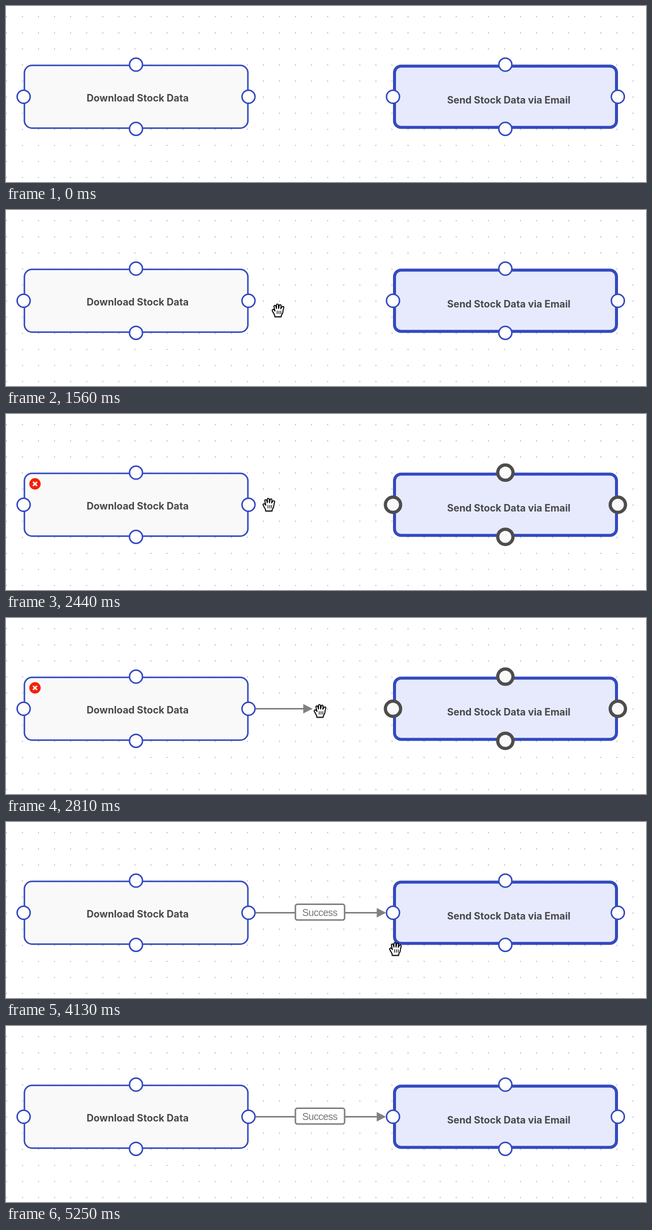
Animation, 1280 px wide and 352 px high, one loop 5.31 s. Source, as an HTML page with a canvas:

```html
<!DOCTYPE html>
<html lang="en">
<head>
<meta charset="utf-8">
<title>Connecting two steps</title>
<style>
html, body { margin: 0; width: 100%; height: 100%; overflow: hidden; background: #fff; }
canvas { display: block; }
</style>
</head>
<body>
<canvas id="stage" width="1280" height="352"></canvas>
<script>
const ctx = document.getElementById('stage').getContext('2d');
const LOOP = 5310, STEP = 62.5;
const BLUE = '#344abf', GREY = '#808080', DARK = '#4d4d4d';
const MID_Y = 181.5;

// Moments at which the state switches, in ms
const T = { enter: 1190, hover: 1870, drag: 2240, leave: 2370, snap: 3300, drop: 3740, off: 3860, exit: 5060 };

// Cursor path: time, x, y
const PATH = [
  [1190, 600, 375], [1560, 544, 201], [2000, 489.5, 180], [2250, 489.5, 180],
  [2810, 628, 186], [3400, 757, 199], [3740, 757, 199],
  [4440, 795, 295], [4690, 798, 305], [5060, 806, 375]
];

const HAND = new Path2D('M-6.5 12.5V9.5C-8 7-10 3-11.2 1C-12.4-1.2-9.8-3.4-7.8-1.2L-6 1L-8-7.5' +
  'C-8.6-10.3-5.3-11.3-4.4-8.5L-3-4V-10.5C-3-13.7 .6-13.7 .8-10.5L1.2-4L2.6-10' +
  'C3.2-12.8 6.6-12 6.2-9L5.5-3.5L8-7C9.6-9.4 12.4-7.6 11.4-5C10-1.5 10 1 9.5 4' +
  'C9 7 7 8.5 6.5 10V12.5Z');
const POINTER = new Path2D('M-5.5 12.5V10C-7 7-9.5 5-11 2C-12-.5-9.5-2-7.5 0L-5.8 2L-8.8-9' +
  'C-9.5-12.5-6-13.2-5-10.5L-2.8-4C-1.8-5.8 .9-5.4 1.3-3.4C2.6-4.8 5-4.2 5.4-2.2' +
  'C7.2-3.2 9.3-2 9.6 .2C10.4 4 9.6 6 8.5 8.5L7.5 12.5Z');

function cursorAt(t) {
  let i = 0;
  while (i < PATH.length - 2 && t > PATH[i + 1][0]) i++;
  const [t0, x0, y0] = PATH[i], [t1, x1, y1] = PATH[i + 1];
  const p = Math.min(1, Math.max(0, (t - t0) / (t1 - t0)));
  const e = p * p * (3 - 2 * p);
  return { x: x0 + (x1 - x0) * e, y: y0 + (y1 - y0) * e };
}

function line(x0, y0, x1, y1, color, width) {
  ctx.strokeStyle = color;
  ctx.lineWidth = width;
  ctx.beginPath();
  ctx.moveTo(x0, y0);
  ctx.lineTo(x1, y1);
  ctx.stroke();
}

function box(x, y, w, h, r, border, stroke, fill) {
  ctx.beginPath();
  ctx.roundRect(x + border / 2, y + border / 2, w - border, h - border, r);
  ctx.fillStyle = fill;
  ctx.fill();
  ctx.strokeStyle = stroke;
  ctx.lineWidth = border;
  ctx.stroke();
}

function text(str, x, y, font, color, spacing) {
  ctx.font = font;
  ctx.letterSpacing = spacing;
  ctx.fillStyle = color;
  ctx.textAlign = 'center';
  ctx.fillText(str, x, y);
}

function port(x, y, outer, width, stroke, fill, alpha = 1) {
  ctx.globalAlpha = alpha;
  ctx.beginPath();
  ctx.arc(x, y, outer - width / 2, 0, 7);
  ctx.fillStyle = fill;
  ctx.fill();
  ctx.strokeStyle = stroke;
  ctx.lineWidth = width;
  ctx.stroke();
  ctx.globalAlpha = 1;
}

const bluePort = (x, y, alpha) => port(x, y, 14.5, 3, BLUE, '#fff', alpha);
const darkPort = (x, y) => port(x, y, 18.5, 6.5, DARK, '#f9f9f9');
const bigPort = (x, y) => port(x, y, 21.5, 12, DARK, '#fff');

function dots() {
  ctx.fillStyle = '#6464b4';
  for (let y = 21.5; y < 352; y += 32.15)
    for (let x = 0.8; x < 1280; x += 32.13) ctx.fillRect(x - 0.7, y - 0.7, 1.4, 1.4);
}

function node(x, label, baseline, border, fill) {
  box(x, 117.3, 450, 128.4, border > 4 ? 13 : 15, border, BLUE, fill);
  text(label, x + 228 + (border > 4 ? 3.5 : 0), baseline, '700 19.6px Inter, sans-serif', '#48484b', '0px');
}

function removeBadge() {
  ctx.fillStyle = '#f4200c';
  ctx.beginPath();
  ctx.arc(58, 139.7, 11.4, 0, 7);
  ctx.fill();
  line(54, 135.7, 62, 143.7, '#fff', 3);
  line(62, 135.7, 54, 143.7, '#fff', 3);
}

function arrow(tip) {
  line(499, MID_Y, tip - 16, MID_Y, GREY, 3);
  ctx.fillStyle = GREY;
  ctx.beginPath();
  ctx.moveTo(tip, MID_Y);
  ctx.lineTo(tip - 18.5, MID_Y - 9.5);
  ctx.lineTo(tip - 18.5, MID_Y + 9.5);
  ctx.fill();
}

function successLabel() {
  box(577.3, 163, 101.4, 34.6, 4, 3, GREY, '#fff');
  text('Success', 627.7, 187.5, '19.6px "Liberation Sans", Arial, sans-serif', '#777', '-0.55px');
}

function cross() {
  for (const [color, width, r] of [['#fff', 4, 11.5], ['#111', 1.7, 10.5]]) {
    line(-r, 0, r, 0, color, width);
    line(0, -r, 0, r, color, width);
  }
}

function hand(shape, dx, top) {
  ctx.lineJoin = 'round';
  ctx.shadowColor = 'rgba(0,0,0,.35)';
  ctx.shadowBlur = 3;
  ctx.shadowOffsetY = 1.5;
  ctx.fillStyle = '#fff';
  ctx.fill(shape);
  ctx.shadowColor = 'transparent';
  ctx.strokeStyle = '#000';
  ctx.lineWidth = 1.9;
  ctx.stroke(shape);
  for (let i = -1; i <= 1; i++) line(dx + i * 3.6, top, dx + i * 3.6, top + 6.5, '#000', 1.4);
}

function cursor(t, { x, y }) {
  ctx.save();
  ctx.translate(x, y);
  if (t >= T.hover && t < T.leave) cross();
  else if (t >= T.snap && t < T.off) hand(POINTER, 2, 2);
  else hand(HAND, 2, 0.5);
  ctx.restore();
}

function draw(t) {
  const pos = cursorAt(t);
  const dragging = t >= T.drag && t < T.drop;
  const snapped = dragging && t >= T.snap;
  const linked = t >= T.drop;

  ctx.fillStyle = '#fff';
  ctx.fillRect(0, 0, 1280, 352);
  dots();
  node(35.3, 'Download Stock Data', 191.3, 3, '#f9f9f9');
  node(774, 'Send Stock Data via Email', 194.6, 6, '#e6eafc');
  if (t >= T.hover && t < T.drop) removeBadge();

  bluePort(260, 117.3);
  bluePort(260, 245.7);
  bluePort(35.3, MID_Y);
  bluePort(485, MID_Y, t >= T.hover && t < T.leave ? 0.85 : 1);

  const endPort = dragging ? darkPort : bluePort;
  endPort(998.7, 117.3);
  endPort(998.7, 245.7);
  endPort(1223.7, MID_Y);
  (snapped ? bigPort : endPort)(774, MID_Y);

  const tip = linked || snapped ? 760 : Math.min(760, pos.x - 15);
  if (linked || (dragging && tip > 518)) arrow(tip);
  if (linked) successLabel();
  if (t >= T.enter && t < T.exit) cursor(t, pos);
}

function tick(now) {
  const t = now % LOOP;
  draw(Math.floor((t + 3) / STEP) * STEP);
  requestAnimationFrame(tick);
}
draw(0);
requestAnimationFrame(tick);
</script>
</body>
</html>
```
